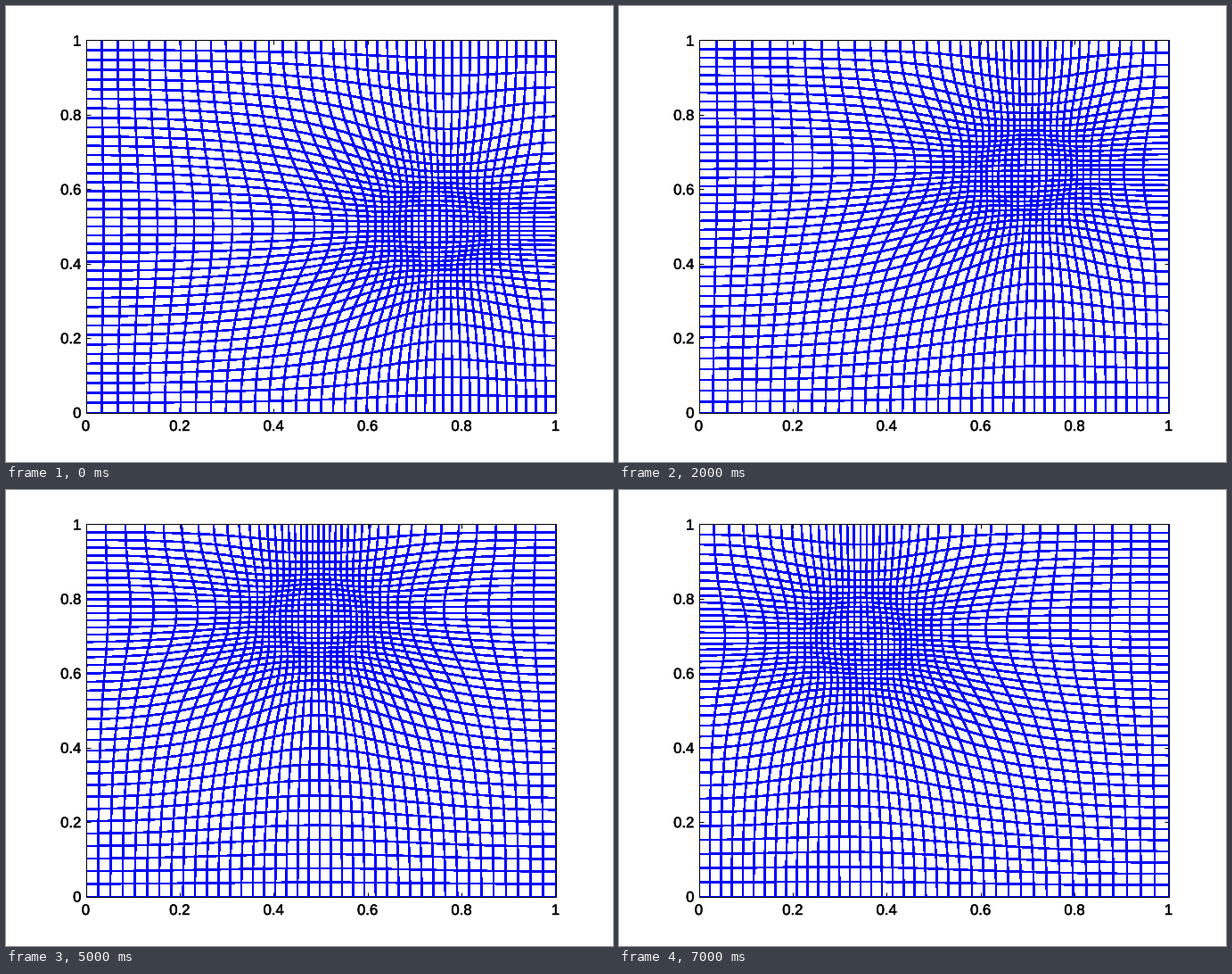
Animation, 681 px wide and 511 px high, one loop 8 s. Source, as a matplotlib script:

```python
import numpy as np
import matplotlib.pyplot as plt
from matplotlib.animation import FuncAnimation
from matplotlib.collections import LineCollection
from matplotlib.patheffects import withStroke

W, H, DPI = 681, 511, 100
PX = 72 / DPI                 # one pixel in points
FRAMES, INTERVAL = 8, 1000
TURN = 0.32                   # step of the ring around the circle, radians
N = 40                        # mesh cells per side
STEP = 1 / N

nodes = np.linspace(0, 1, N + 1)
xi, eta = np.meshgrid(nodes, nodes, indexing="ij")

# Cosine basis for the Poisson problem with zero normal slope
k = np.arange(N + 1)
basis = np.cos(np.pi * np.outer(k, k) / N)
inverse = np.linalg.inv(basis)
eig = (2 * np.cos(np.pi * k / N) - 2) / STEP**2
laplace = eig[:, None] + eig[None, :]
laplace[0, 0] = 1


def solve_poisson(rhs):
    coef = inverse @ rhs @ inverse.T / laplace
    coef[0, 0] = 0
    return basis @ coef @ basis.T


def density(x, y, angle):
    """Mesh density, highest on a small ring that moves round the centre."""
    cx = 0.5 + 0.25 * np.cos(angle)
    cy = 0.5 + 0.25 * np.sin(angle)
    r2 = (x - cx)**2 + (y - cy)**2
    return 1 + 5 * np.exp(-50 * np.abs(r2 - 0.01))


def derivatives(phi):
    p = np.pad(phi, 1, mode="reflect")
    mid = p[1:-1, 1:-1]
    px = (p[2:, 1:-1] - p[:-2, 1:-1]) / (2 * STEP)
    py = (p[1:-1, 2:] - p[1:-1, :-2]) / (2 * STEP)
    pxx = (p[2:, 1:-1] - 2 * mid + p[:-2, 1:-1]) / STEP**2
    pyy = (p[1:-1, 2:] - 2 * mid + p[1:-1, :-2]) / STEP**2
    pxy = (p[2:, 2:] - p[2:, :-2] - p[:-2, 2:] + p[:-2, :-2]) / (4 * STEP**2)
    return px, py, pxx, pyy, pxy


def mesh(angle, rounds=350, relax=0.5):
    """Spread the density evenly over the cells (Monge-Ampere equation)."""
    phi = np.zeros_like(xi)
    for _ in range(rounds):
        px, py, pxx, pyy, pxy = derivatives(phi)
        area = np.maximum((1 + pxx) * (1 + pyy) - pxy**2, 1e-3)
        load = np.sqrt(area * density(xi + px, eta + py, angle))
        phi -= relax * solve_poisson(load)
    px, py = derivatives(phi)[:2]
    return np.stack([xi + px, eta + py], axis=-1)


plt.rcParams["font.family"] = "Liberation Sans"
fig = plt.figure(figsize=(W / DPI, H / DPI), dpi=DPI, facecolor="white")
left, right, top, bottom = 89.5, 616.5, 38.5, 455.5
ax = fig.add_axes([left / W, 1 - bottom / H,
                   (right - left) / W, (bottom - top) / H])
ax.set(xlim=(0, 1), ylim=(0, 1))
ticks = np.linspace(0, 1, 6)
labels = [f"{t:.1g}" for t in ticks]
ax.set_xticks(ticks, labels)
ax.set_yticks(ticks, labels)
ax.tick_params(direction="in", top=True, right=True, length=5 * PX,
               width=PX, labelsize=16.7 * PX)
ax.tick_params(axis="x", pad=8.5 * PX)
ax.tick_params(axis="y", pad=5 * PX)
for label in ax.get_xticklabels() + ax.get_yticklabels():
    label.set_path_effects([withStroke(linewidth=0.5 * PX,
                                       foreground="black")])
for spine in ax.spines.values():
    spine.set(linewidth=PX, antialiased=False)

grid = LineCollection([], colors="#0000ff", linewidths=1.6 * PX,
                      antialiaseds=False, zorder=2)
ax.add_collection(grid, autolim=False)

meshes = [mesh(TURN * i) for i in range(FRAMES)]


def draw(i):
    points = meshes[i]
    grid.set_segments([*points, *points.transpose(1, 0, 2)])
    return [grid]


anim = FuncAnimation(fig, draw, frames=FRAMES, interval=INTERVAL,
                     repeat=True, repeat_delay=0)
plt.show()
```
